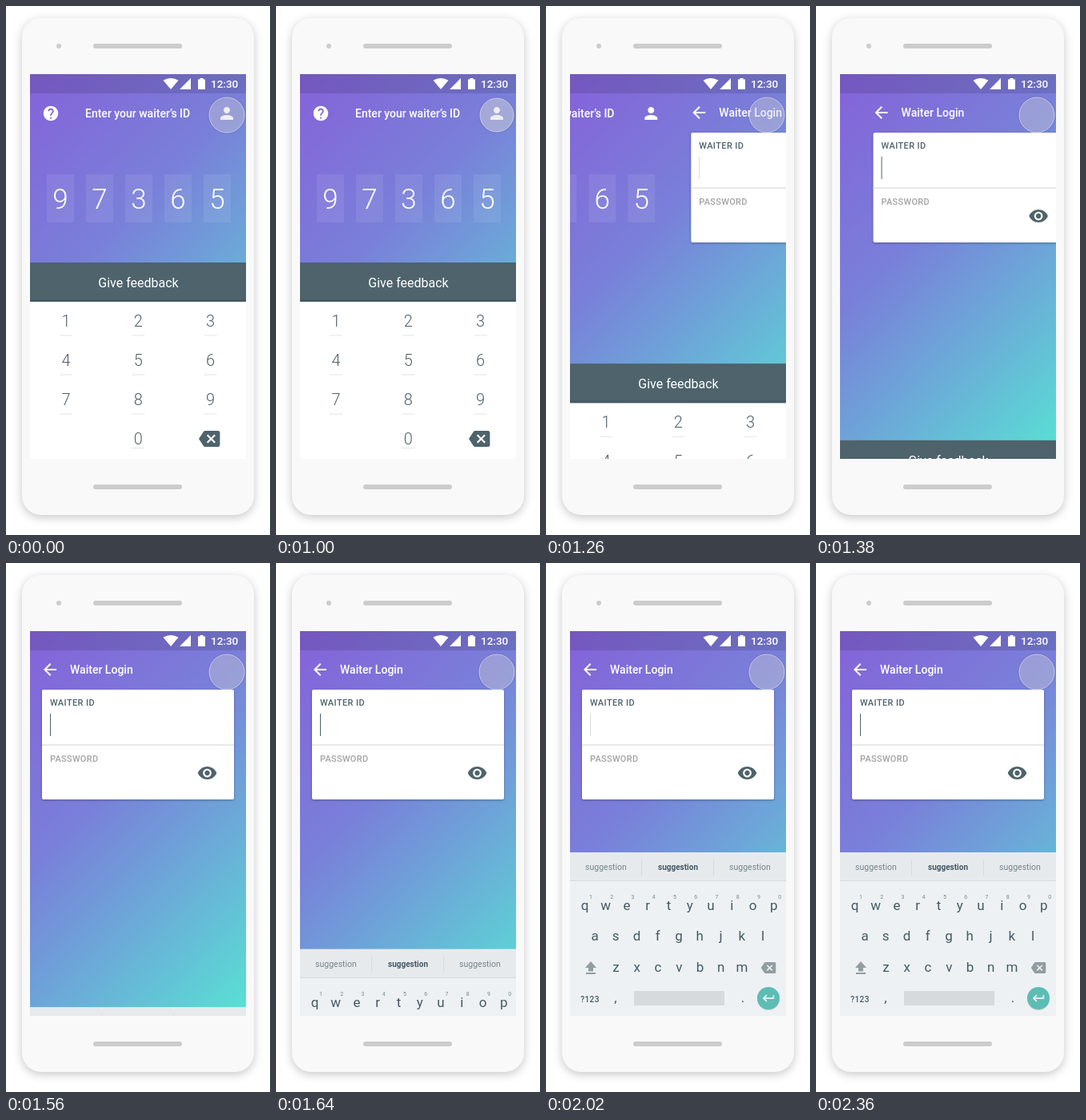
Write an HTML page that moves like this. It is 330 px wide and 660 px high and loops after 3.36 s.

```html
<!DOCTYPE html>
<html lang="en">
<head>
<meta charset="utf-8">
<title>Waiter login</title>
<style>
html, body { margin: 0; width: 100%; height: 100%; overflow: hidden; background: #fff; }
svg { display: block; width: 330px; height: 660px; font-family: Roboto, sans-serif; }
.mid { text-anchor: middle; }
.medium { font-weight: 500; }
.light { font-weight: 300; }
.phone { filter: drop-shadow(0 3px 6px rgba(0,0,0,.22)); }
.card { filter: drop-shadow(0 1px 1.5px rgba(0,0,0,.3)); }
</style>
</head>
<body>
<svg viewBox="0 0 330 660">
  <defs>
    <linearGradient id="sky" gradientUnits="userSpaceOnUse" x1="-22.5" y1="137.5" x2="352.5" y2="512.5">
      <stop offset="0" stop-color="#8562d9"/>
      <stop offset=".4" stop-color="#7980d9"/>
      <stop offset=".65" stop-color="#6ca8d8"/>
      <stop offset="1" stop-color="#58e2d4"/>
    </linearGradient>
    <clipPath id="screen"><rect x="30" y="85" width="270" height="480"/></clipPath>
    <path id="backspace" d="M22 3H7c-.69 0-1.23.35-1.59.88L0 12l5.41 8.11c.36.53.9.89 1.59.89h15c1.1 0 2-.9 2-2V5c0-1.1-.9-2-2-2zm-3 12.59L17.59 17 14 13.41 10.41 17 9 15.59 12.59 12 9 8.41 10.41 7 14 10.59 17.59 7 19 8.41 15.41 12 19 15.59z"/>
  </defs>

  <rect class="phone" x="20" y="15" width="290" height="620" rx="24" fill="#f9f9f9"/>
  <g fill="#ccc">
    <circle cx="66" cy="50" r="3"/>
    <rect x="109" y="47" width="111" height="6" rx="3"/>
    <rect x="109" y="597" width="111" height="6" rx="3"/>
  </g>

  <g clip-path="url(#screen)">
    <rect x="30" y="85" width="270" height="480" fill="url(#sky)"/>

    <g id="idPage" fill="#fff">
      <path transform="translate(45 123) scale(.92)" d="M12 2C6.48 2 2 6.48 2 12s4.48 10 10 10 10-4.48 10-10S17.52 2 12 2zm1 17h-2v-2h2v2zm2.07-7.75l-.9.92C13.45 12.9 13 13.5 13 15h-2v-.5c0-1.1.45-2.1 1.17-2.83l1.24-1.26c.37-.36.59-.86.59-1.41 0-1.1-.9-2-2-2s-2 .9-2 2H8c0-2.21 1.79-4 4-4s4 1.79 4 4c0 .88-.36 1.68-.93 2.25z"/>
      <text class="medium" x="99" y="139" font-size="14">Enter your waiter’s ID</text>
      <path transform="translate(264 122)" d="M12 12c2.21 0 4-1.79 4-4s-1.79-4-4-4-4 1.79-4 4 1.79 4 4 4zm0 2c-2.67 0-8 1.34-8 4v2h16v-2c0-2.66-5.33-4-8-4z"/>
      <g id="code" class="mid light" font-size="35"></g>
    </g>

    <g id="loginPage">
      <path fill="#fff" transform="translate(43 121)" d="M20 11H7.83l5.59-5.59L12 4l-8 8 8 8 1.41-1.41L7.83 13H20v-2z"/>
      <text class="medium" x="80" y="138" font-size="14" fill="#fff">Waiter Login</text>
      <rect class="card" x="45" y="158" width="240" height="137" rx="2" fill="#fff"/>
      <rect x="45" y="226" width="240" height="2" fill="#e8e8e8"/>
      <g class="medium" font-size="11">
        <text x="55" y="178" letter-spacing=".4" fill="#4e636b">WAITER ID</text>
        <text x="55" y="248" letter-spacing=".3" fill="#a3a3a3">PASSWORD</text>
      </g>
      <rect id="cursor" x="55" y="188" width="1" height="28" fill="#4e636b"/>
      <path fill="#4e636b" transform="translate(238.7 249.2) scale(1.07)" d="M12 4.5C7 4.5 2.73 7.61 1 12c1.73 4.39 6 7.5 11 7.5s9.27-3.11 11-7.5c-1.73-4.39-6-7.5-11-7.5zM12 17c-2.76 0-5-2.24-5-5s2.24-5 5-5 5 2.24 5 5-2.24 5-5 5zm0-8c-1.66 0-3 1.34-3 3s1.34 3 3 3 3-1.34 3-3-1.34-3-3-3z"/>
    </g>

    <g id="pad" fill="#4e636b">
      <rect x="30" y="369" width="270" height="200" fill="#fff"/>
      <rect x="30" y="320" width="270" height="49"/>
      <rect x="30" y="366" width="270" height="3" fill="#465a64"/>
      <text class="mid" x="165.5" y="351" font-size="16" fill="#fff">Give feedback</text>
      <g id="numbers" class="mid light" font-size="20"></g>
      <use href="#backspace" transform="translate(241 526.8) scale(1.1)"/>
    </g>

    <g id="keyboard" fill="#455a64">
      <rect x="30" y="361" width="270" height="204" fill="#edf1f3"/>
      <rect x="30" y="361" width="270" height="36" fill="#e7eaed"/>
      <path d="M30 396.5H300M119.5 370V390M209.5 370V390" stroke="#d6dbde"/>
      <g class="mid" font-size="10.5" fill="#76858c">
        <text x="75" y="383">suggestion</text>
        <text x="165" y="383" font-size="10" font-weight="700" fill="#455a64">suggestion</text>
        <text x="255" y="383">suggestion</text>
      </g>
      <g id="letters" class="mid" font-size="17"></g>
      <g fill="#929da2">
        <path d="M56 497l7 8h-4v4.500h-6v-4.500h-4zM50 511h12v2h-12z"/>
        <use href="#backspace" transform="translate(268.800 495.800) scale(.77)"/>
      </g>
      <text class="mid medium" x="55" y="548" font-size="10" letter-spacing=".4">?123</text>
      <rect x="110" y="534" width="113" height="18" rx="1" fill="#d6dadc"/>
      <circle cx="278" cy="544" r="14" fill="#000" opacity=".15"/>
      <circle cx="278" cy="543" r="14" fill="#5cbdb4"/>
      <path fill="#fff" transform="translate(269.400 534) scale(.75)" d="M19 7v4H5.830l3.580-3.590L8 6l-6 6 6 6 1.410-1.410L5.830 13H21V7z"/>
    </g>

    <rect x="30" y="85" width="270" height="24" opacity=".12"/>
    <g fill="#fff">
      <path d="M206 104l-9.500-11.300q9.500-5.600 19 0zM231 90v14h-14zM240 91.500h2.500v-1.500h4v1.500h2.500v12.500h-9z"/>
      <text x="256" y="102" class="medium" font-size="13.500">12:30</text>
    </g>
    <circle id="touch" cx="276" cy="136" fill="#fff" stroke="#fff" stroke-opacity=".5"
      style="filter:drop-shadow(0 0 1px rgba(0,0,0,.3))"/>
  </g>
</svg>
<script>
const $ = id => document.getElementById(id);
const label = (x, y, s, extra = '') => `<text x="${x}" y="${y}" ${extra}>${s}</text>`;

$('code').innerHTML = [...'97365'].map((d, i) => {
  const x = 68 + 49 * i;
  return `<rect x="${x - 17}" y="210" width="34" height="60" rx="1" opacity=".08"/>` + label(x, 252.5, d);
}).join('');

$('numbers').innerHTML = [...'123456789 0'].map((d, i) => {
  if (d === ' ') return '';
  const x = 75 + 90.3 * (i % 3), y = 400 + 49 * Math.floor(i / 3);
  const line = i > 8 ? 551 : y + 10.5;
  return label(x, y, d) + `<rect x="${x - 8}" y="${line}" width="16" height="1" fill="#e0e5e7"/>`;
}).join('');

const STEP = 26.25;
const row = (keys, x, y) => [...keys].map((k, i) => label(x + STEP * i, y, k)).join('');
$('letters').innerHTML =
  row('qwertyuiop', 48.5, 433) + row('asdfghjkl', 61, 471) + row('zxcvbnm', 87.5, 510) +
  label(87, 548, ',') + label(246, 548, '.') +
  [...'1234567890'].map((d, i) => label(56 + STEP * i, 419, d, 'font-size="7" fill="#78888f"')).join('');

const LOOP = 3360, END = 2360;
const ease = (t, start, length) => {
  const p = Math.min(1, Math.max(0, (t - start) / length));
  return p * p * (3 - 2 * p);
};
const move = (id, x, y) => $(id).setAttribute('transform', `translate(${x} ${y})`);

function draw(now) {
  const t = Math.min(END, Math.floor(now % LOOP / 20) * 20);
  const slide = ease(t, 1056, 400), rise = ease(t, 1523, 267);
  const press = t >= 1000 && t < 1220 ? Math.sin(Math.PI * (t - 980) / 240) : 0;
  move('idPage', -281 * slide, 0);
  move('loginPage', 281 * (1 - slide), 0);
  move('pad', 0, 245 * slide);
  move('keyboard', 0, 204 * (1 - rise));
  $('touch').setAttribute('r', 22 - 4 * press);
  $('touch').setAttribute('fill-opacity', .3 + .35 * press);
  $('cursor').setAttribute('opacity', (t + 240) % 800 < 320 ? 1 : .22);
  requestAnimationFrame(draw);
}
draw(0);
</script>
</body>
</html>
```
